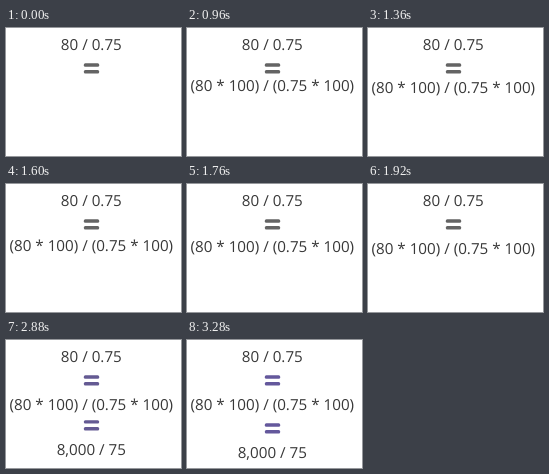
An HTML page for the animation above (9.36 s loop, 175x128 px).

```html
<!DOCTYPE html>
<html lang="en">
<head>
<meta charset="utf-8">
<title>Division steps</title>
<style>
  html, body { margin: 0; width: 100%; height: 100%; overflow: hidden; background: #fff; }
  svg { display: block; width: 100vw; height: 100vh; }
  text {
    font: 15.2px "Open Sans", "Noto Sans", sans-serif;
    fill: #383838;
    text-anchor: middle;
    text-rendering: geometricPrecision;
  }
</style>
</head>
<body>
<svg viewBox="0 0 175 128">
  <defs>
    <g id="equals">
      <rect x="77.8" y="0" width="15.4" height="3.4" rx="1.5"/>
      <rect x="77.8" y="6.8" width="15.4" height="3.4" rx="1.5"/>
    </g>
  </defs>
  <text x="85.3" y="21.8">80 / 0.75</text>
  <g id="signs">
    <use href="#equals" y="35.3"/>
    <use id="secondSign" href="#equals" y="83.3"/>
  </g>
  <text id="scaled" x="85.3" y="69.8">(80 * 100) / (0.75 * 100)</text>
  <text id="result" x="85.3" y="117.8">8,000 / 75</text>
</svg>
<script>
  const LOOP = 9360, STEP = 80;
  const SCALED = { start: 960, end: 1920, rise: 7 };
  const RESULT = { start: 2640, end: 3280, rise: 8 };
  const GRAY = [100, 100, 100], PURPLE = [100, 88, 156];

  const byId = id => document.getElementById(id);
  const signs = byId("signs"), secondSign = byId("secondSign");
  const scaled = byId("scaled"), result = byId("result");

  const progress = (t, { start, end }) => Math.min(1, Math.max(0, (t - start) / (end - start)));
  const easeIn = p => p ** 1.3;
  const easeOut = p => 1 - (1 - p) ** 2;
  const mix = (a, b, k) => `rgb(${a.map((v, i) => Math.round(v + (b[i] - v) * k))})`;

  function slide(element, t, phase, eased) {
    element.setAttribute("visibility", t < phase.start ? "hidden" : "visible");
    element.setAttribute("transform", `translate(0 ${(eased - 1) * phase.rise})`);
  }

  function draw(time) {
    const t = Math.floor((time % LOOP) / STEP) * STEP;
    const drop = easeOut(progress(t, RESULT));
    slide(scaled, t, SCALED, easeIn(progress(t, SCALED)));
    slide(secondSign, t, RESULT, drop);
    slide(result, t, RESULT, drop);
    signs.setAttribute("fill", mix(GRAY, PURPLE, t < RESULT.start ? 0 : 0.6 + 0.4 * drop));
  }

  const origin = performance.now();
  function tick() {
    draw(performance.now() - origin);
    requestAnimationFrame(tick);
  }
  tick();
</script>
</body>
</html>
```
